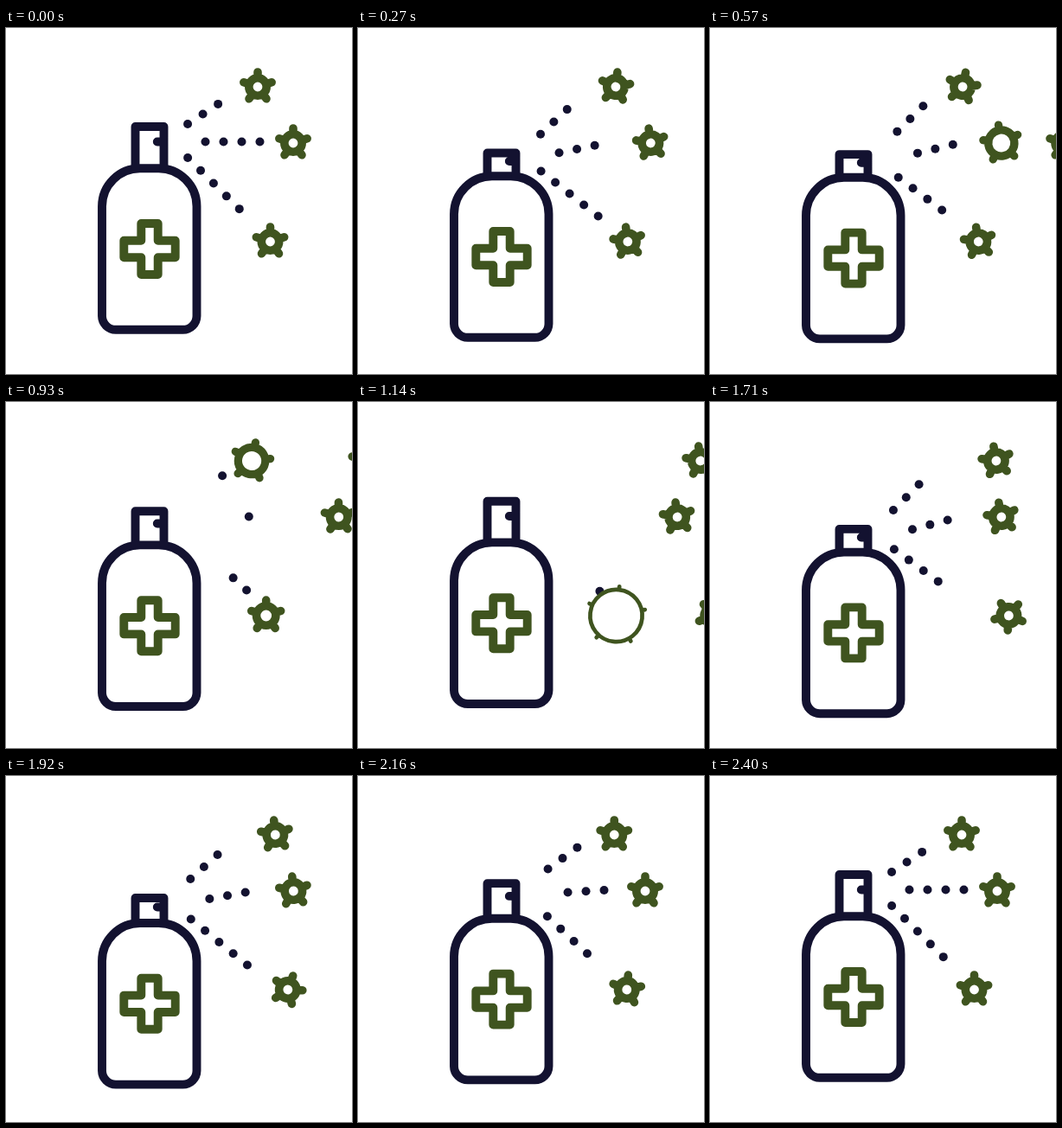
An HTML page with a canvas that plays this animation: 400x400 px, repeating every 4430 ms.

```html
<!DOCTYPE html>
<html>
<head>
<meta charset="utf-8">
<style>
html, body { margin: 0; height: 100%; overflow: hidden; background: #fff; }
canvas { display: block; width: 100vw; height: 100vh; }
</style>
</head>
<body>
<canvas width="400" height="400"></canvas>
<script>
const ctx = document.querySelector('canvas').getContext('2d');
const NAVY = '#131230', GREEN = '#3f541f';
const LOOP = 4430, ACTIVE = 2400, PRESS = 1200, STEP = 30;
const GAP = 21, BURST = 320, GLIDE = 2000, { PI, sin, cos, hypot } = Math;

const clamp = v => Math.max(0, Math.min(1, v));
const smooth = v => (v = clamp(v), v * v * (3 - 2 * v));

// Each germ sways and bursts at `pop`; its successor glides in over `span` after `delay`.
const germs = [
  { x: 291, y: 68, pop: 788, sway: 1200, tilt: 12.5, tiltTime: 1500, span: 150, delay: 400, rock: 12, roll: 0 },
  { x: 332, y: 133, pop: 436, sway: 1500, tilt: -9.6, tiltTime: 930, span: 95, delay: 0, rock: 12, roll: 0 },
  { x: 305.5, y: 247, pop: 870, sway: 1500, tilt: -9.6, tiltTime: 930, span: 150, delay: 400, rock: 0, roll: 1 }
];

// Start and end of each spray line.
const jets = [
  [192.5, 122.5, 256.2, 80.6],
  [209.5, 131.5, 293.4, 131.5],
  [195.2, 135.2, 280, 219.3]
];

const body = new Path2D('M155.5 162.2H176.5A44 44 0 0 1 220.5 206.2V333A16 16 0 0 1 204.5 348.8' +
  'H127A16 16 0 0 1 111 333V206.2A44 44 0 0 1 155.5 162.2Z');
const cross = new Path2D('M156.3 226H175.7V245.8H195.7V265.2H175.7V285H156.3V265.2H136.3V245.8H156.3Z');

function stroke(path, color, width = 9.9) {
  ctx.strokeStyle = color;
  ctx.lineWidth = width;
  ctx.stroke(path);
}

function drawBottle(lift, press) {
  ctx.save();
  ctx.translate(0, 12 * lift);
  stroke(body, NAVY);
  stroke(cross, GREEN);
  const top = 114 + 21.5 * press, hole = 131.5 + 13.6 * press;
  stroke(new Path2D(`M149.5 162V${top}H182.5V162M174.8 ${hole}H182.5`), NAVY);
  ctx.restore();
}

function drawGerm(x, y, degrees, burst = 0) {
  const grow = 28 * burst * burst, r = 10.2 + grow, tip = 17 + 0.85 * grow;
  const path = new Path2D();
  path.arc(0, 0, r, 0, 2 * PI);
  for (let k = 0; k < 5; k++) {
    const a = (k * 72 - 90) * PI / 180;
    path.moveTo(r * cos(a), r * sin(a));
    path.lineTo(tip * cos(a), tip * sin(a));
  }
  ctx.save();
  ctx.translate(x, y);
  ctx.rotate(degrees * PI / 180);
  stroke(path, GREEN, 9.6 * (1 - burst ** 4));
  ctx.restore();
}

function moveGerm(g, t) {
  const burst = clamp((t - g.pop) / BURST);
  if (burst < 1) {
    drawGerm(g.x + 7 * sin(2 * PI * t / g.sway), g.y, g.tilt * sin(PI * t / g.tiltTime), burst);
  }
  const away = g.span * (1 + cos(PI * clamp((t - g.delay) / GLIDE))) / 2;
  const rock = g.rock * sin(PI * clamp((t - 900) / 1200));
  drawGerm(g.x + away, g.y, g.roll * away - rock);
}

function drawJet([x0, y0, x1, y1], lift, t) {
  const rest = hypot(x1 - x0, y1 - y0);
  y0 += 23.3 * lift;
  const len = hypot(x1 - x0, y1 - y0);

  // The line empties from the nozzle after the first press and refills on the second.
  const refill = t >= 1150;
  const from = Math.max(18, refill ? 0 : len * clamp(0.2 + (t - 570) / 760));
  const to = refill ? len * clamp(0.2 + (t - 1150) / 365) : len;

  const u = t / PRESS % 1;
  const shift = (6 * GAP * u - 8 * sin(PI * u)) % GAP + 0.2 * (len - rest);
  ctx.fillStyle = NAVY;
  for (let s = shift - GAP; s <= to; s += GAP) {
    if (s < from) continue;
    ctx.beginPath();
    ctx.arc(x0 + (x1 - x0) * s / len, y0 + (y1 - y0) * s / len, 5, 0, 2 * PI);
    ctx.fill();
  }
}

function draw(t) {
  const phase = t % PRESS;
  const lift = phase < 400 ? smooth(phase / 400) : smooth((PRESS - phase) / 800);
  const press = Math.min(smooth(phase / 200), smooth((PRESS - phase) / 600));
  ctx.clearRect(0, 0, 400, 400);
  drawBottle(lift, press);
  jets.forEach(j => drawJet(j, lift, t));
  germs.forEach(g => moveGerm(g, t));
}

ctx.lineJoin = ctx.lineCap = 'round';
jets[1][2] += 0.5;
const start = performance.now();
function frame() {
  const t = (performance.now() - start) % LOOP;
  draw(Math.min(ACTIVE, Math.floor(t / STEP) * STEP));
  requestAnimationFrame(frame);
}
frame();
</script>
</body>
</html>
```
